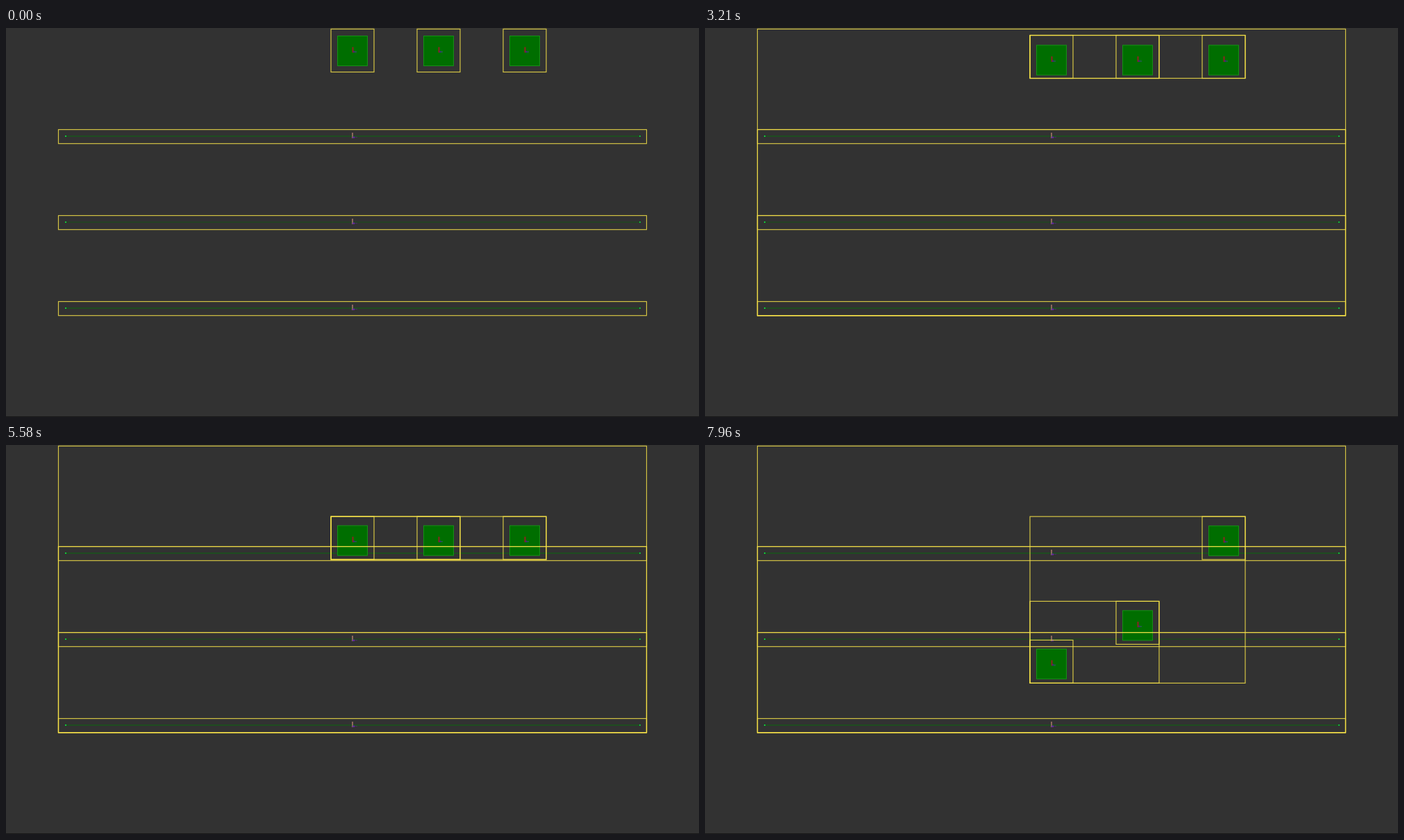
These frames come from a looping animation (998 by 561 pixels, 8000 ms). An HTML page with a canvas:

```html
<!DOCTYPE html>
<html lang="en">
<head>
<meta charset="utf-8">
<title>Bounding volume tree</title>
<style>
  html, body { margin: 0; width: 100%; height: 100%; overflow: hidden; background: #323232; }
  canvas { display: block; }
</style>
</head>
<body>
<canvas id="stage" width="998" height="561"></canvas>
<script>
const ctx = document.getElementById('stage').getContext('2d');
const LOOP = 8000, FRAME = 1000 / 24;
const TREE_START = 40, FALL_START = 1890, HALF_GRAVITY = 7.68;
const LEFT = 75.5, RIGHT = 922.5;
const lineYs = [156, 280, 404];
const bodies = [
  { x: 468, maxDrop: Infinity },
  { x: 592, maxDrop: 227.3 },
  { x: 716, maxDrop: 105.2 }
];

function fill(color, x, y, w, h) {
  ctx.fillStyle = color;
  ctx.fillRect(x, y, w, h);
}

// The padded box jumps only after its body has left it.
function boxDrop(drop) {
  let last = 0;
  for (let n = 1; ; n++) {
    const next = n * (9 + Math.min(0.022 * n, 0.33));
    if (next > drop) return last;
    last = next;
  }
}

const union = (...boxes) => [
  Math.min(...boxes.map(b => b[0])), Math.min(...boxes.map(b => b[1])),
  Math.max(...boxes.map(b => b[2])), Math.max(...boxes.map(b => b[3]))
];

function outline([x1, y1, x2, y2]) {
  ctx.strokeStyle = 'rgba(248, 228, 72, 0.82)';
  ctx.lineWidth = 1.2;
  ctx.strokeRect(x1, y1, x2 - x1, y2 - y1);
}

function drawLine(y, i) {
  fill(i === 1 ? '#175017' : '#0b680f', 86, y - 0.5, 827, 1);
  fill('#12c83a', 85, y - 1, 2, 2);
  fill('#12b83a', 912, y - 1, 2, 2);
  fill('#8c6a5c', 498, y - 5, 2, 8);
  fill('#5f2c96', 499, y + 0.5, 3, 2.5);
  fill('#482a66', 502, y + 1, 4, 1);
}

function drawBody(x, drop) {
  const y = 11.5 + drop;
  fill('#006e00', x + 9.5, y, 43, 43);
  ctx.strokeStyle = '#169016';
  ctx.lineWidth = 1;
  ctx.strokeRect(x + 9.5, y, 43, 43);
  fill('#8c2420', x + 30.5, y + 16, 2, 8);
  fill('#45257c', x + 32, y + 21.5, 2, 2.5);
  fill('#3c4a80', x + 34, y + 22.5, 3, 1);
}

function draw(time) {
  const t = Math.floor((time + 4) / FRAME) * FRAME;
  const s = Math.max(0, t - FALL_START) / 1000;
  const fall = HALF_GRAVITY * s * s;
  const drops = bodies.map(b => Math.min(fall, b.maxDrop));

  fill('#323232', 0, 0, 998, 561);
  lineYs.forEach(drawLine);
  bodies.forEach((b, i) => drawBody(b.x, drops[i]));

  const lines = lineYs.map(y => [LEFT, y - 9.5, RIGHT, y + 10.7]);
  const boxes = bodies.map((b, i) => {
    const y = 1.5 + boxDrop(drops[i]);
    return [b.x, y, b.x + 62, y + 62];
  });
  [...lines, ...boxes].forEach(outline);

  if (time >= TREE_START) {
    const lower = union(lines[1], lines[2]);
    const rebuilt = boxDrop(fall) > 0;
    const parents = rebuilt
      ? [union(boxes[0], boxes[1]), union(...boxes), union(lines[0], lower)]
      : [union(boxes[1], boxes[2]), union(boxes[0], lines[0])];
    [lower, ...parents, [LEFT, 1.5, RIGHT, 414.7]].forEach(outline);
  }
  fill('#181818', 0, 560, 998, 1);
}

const start = performance.now();
function tick() {
  draw((performance.now() - start) % LOOP);
  requestAnimationFrame(tick);
}
tick();
</script>
</body>
</html>
```
